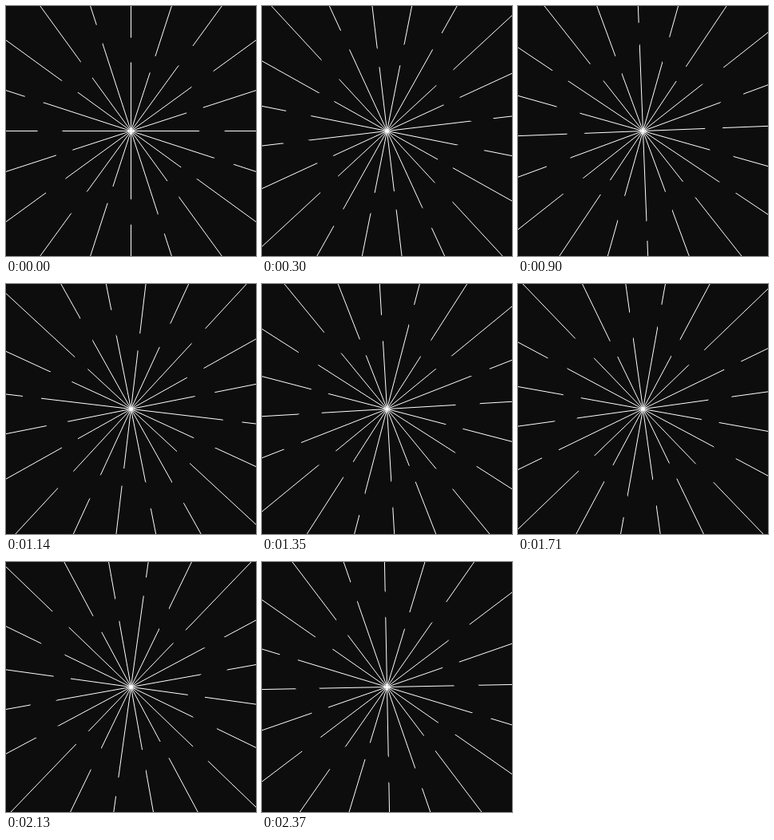
An HTML page with a canvas that plays this animation: 313 px wide and 313 px high, repeating every 2.4 s.

```html
<!DOCTYPE html>
<html lang="en">
<head>
<meta charset="utf-8">
<title>Rotating rays</title>
<style>
  html, body { margin: 0; width: 100%; height: 100%; overflow: hidden; background: #0d0d0d; }
  canvas { display: block; }
</style>
</head>
<body>
<canvas width="313" height="313"></canvas>
<script>
const ctx = document.querySelector('canvas').getContext('2d');
const BACKGROUND = '#0d0d0d';
const SIZE = 313, CENTER = SIZE / 2;
const STEP = 30, STEPS = 80;
const TAU = Math.PI * 2;
const { sin, cos } = Math;

// Edges of the six-lobed ring, p is the phase within a lobe
const outerEdge = p => 117 - 21.5 * cos(p);
const innerEdge = p => 90.2 - 18.6 * cos(p) + 4.5 * cos(2 * p) - 2.1 * cos(3 * p);

function drawRays(turn) {
  ctx.beginPath();
  for (let i = 0; i < 20; i++) {
    const a = turn + i * TAU / 20;
    ctx.moveTo(CENTER, CENTER);
    ctx.lineTo(CENTER + 230 * cos(a), CENTER + 230 * sin(a));
  }
  ctx.strokeStyle = '#fff';
  ctx.lineWidth = 1;
  ctx.stroke();
}

function addLobes(edge) {
  for (let i = 0; i < 360; i++) {
    const a = i * TAU / 360, r = edge(6 * a);
    ctx[i ? 'lineTo' : 'moveTo'](r * cos(a), r * sin(a));
  }
  ctx.closePath();
}

// Background-coloured ring that cuts the gaps; it turns slightly off its centre
function drawRing(turn) {
  ctx.save();
  ctx.translate(CENTER, CENTER);
  ctx.rotate(turn + TAU / 8);
  ctx.translate(-2.2, 0);
  ctx.beginPath();
  addLobes(outerEdge);
  addLobes(innerEdge);
  ctx.fillStyle = BACKGROUND;
  ctx.fill('evenodd');
  ctx.restore();
}

function draw() {
  const step = Math.floor(performance.now() / STEP) % STEPS;
  ctx.fillStyle = BACKGROUND;
  ctx.fillRect(0, 0, SIZE, SIZE);
  drawRays(step / STEPS * TAU / 4);
  drawRing(step / (STEPS - 1) * TAU);
  requestAnimationFrame(draw);
}
draw();
</script>
</body>
</html>
```
